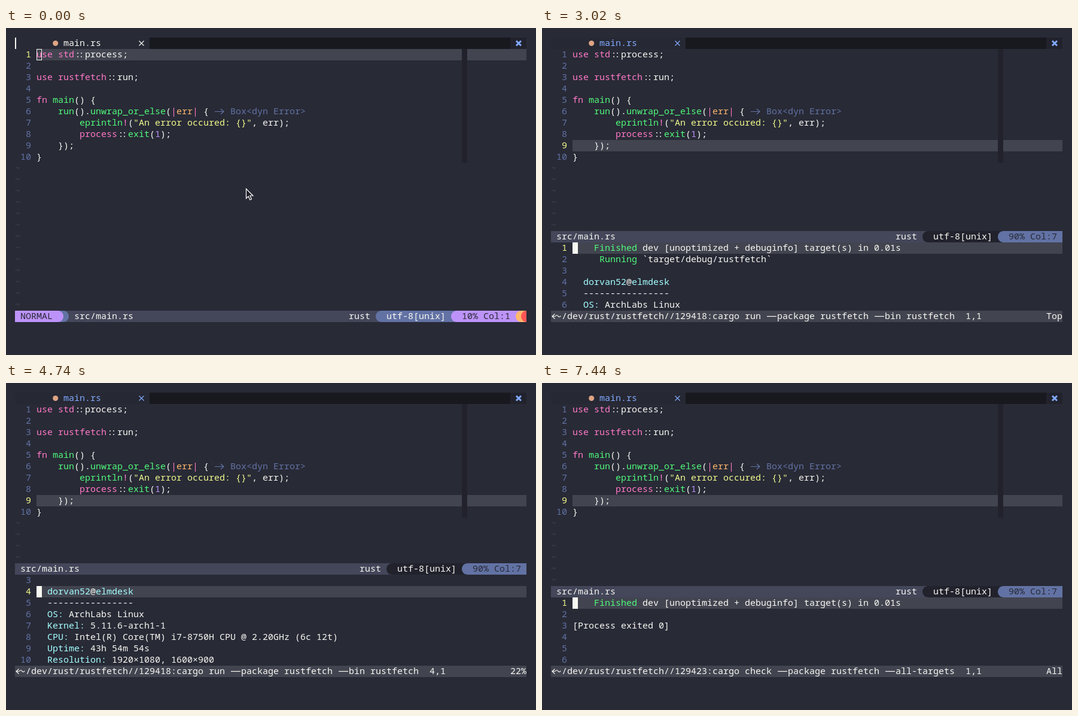
These frames come from a looping animation (886x546 px, 8 s). An HTML page:

```html
<!DOCTYPE html>
<html lang="en">
<head>
<meta charset="utf-8">
<title>Editor session</title>
<style>
html, body { margin: 0; width: 100%; height: 100%; overflow: hidden; background: #282a36; }
svg { display: block; }
text { font: 15px "Noto Sans Mono", "DejaVu Sans Mono", monospace; white-space: pre; font-variant-ligatures: none; }
</style>
</head>
<body>
<svg id="stage" width="886" height="546" viewBox="0 0 886 546"></svg>
<script>
const LOOP = 8000, COLS = 95, STATUS_ROW = 24, CMD_ROW = 25;
const C = {
  bg: '#282a36', dark: '#21222c', tabs: '#18191f', line: '#424450', bar: '#44475a',
  w: '#f8f8f2', p: '#ff79c6', g: '#50fa7b', y: '#f1fa8c', o: '#ffb86c', v: '#bd93f9',
  b: '#6272a4', c: '#a4ffff', r: '#ff5555', tab: '#82aaff', mint: '#a6f3d0', soot: '#212121'
};

// Lines are flat lists of colour key, text, colour key, text ...
const CODE = [
  ['p', 'use std', 'w', '::process;'],
  [],
  ['p', 'use rustfetch', 'w', '::run;'],
  [],
  ['p', 'fn ', 'g', 'main', 'w', '() {'],
  ['g', '    run', 'w', '().', 'g', 'unwrap_or_else', 'w', '(', 'p', '|', 'o', 'err', 'p', '|', 'w', ' { ', 'b', '-> Box<dyn Error>'],
  ['g', '        eprintln', 'p', '!', 'w', '(', 'y', '"An error occured: {}"', 'w', ', err);'],
  ['p', '        process', 'w', '::', 'g', 'exit', 'w', '(', 'v', '1', 'w', ');'],
  ['w', '    });'],
  ['w', '}']
];
const finished = ['g', '    Finished', 'w', ' dev [unoptimized + debuginfo] target(s) in 0.01s'];
const exited = ['w', '[Process exited 0]'];
const info = (label, value) => ['c', `  ${label}: `, 'w', value];
const RUN = {
  job: 129418, command: 'cargo run --package rustfetch --bin rustfetch',
  lines: [
    finished,
    ['g', '     Running', 'w', ' `target/debug/rustfetch`'],
    [],
    ['c', '  dorvan52', 'w', '@', 'c', 'elmdesk'],
    ['w', '  ' + '-'.repeat(16)],
    info('OS', 'ArchLabs Linux'),
    info('Kernel', '5.11.6-arch1-1'),
    info('CPU', 'Intel(R) Core(TM) i7-8750H CPU @ 2.20GHz (6c 12t)'),
    info('Uptime', '43h 54m 54s'),
    info('Resolution', '1920×1080, 1600×900'),
    info('Packages', '1187'),
    info('WM', 'bspwm'),
    info('Shell', '/bin/zsh'),
    info('Memory', '4911_MB / 15878_MB'),
    [], [],
    exited
  ]
};
const CHECK = {
  job: 129423, command: 'cargo check --package rustfetch --all-targets',
  lines: [finished, [], exited, [], [], []]
};

const X = col => 15 + 9 * col;
const Y = row => 16 + 19 * row;
const escape = s => s.replace(/&/g, '&amp;').replace(/</g, '&lt;');
const box = (x, y, w, h, fill) => `<rect x="${x}" y="${y}" width="${w}" height="${h}" fill="${fill}"/>`;
const cells = (row, col, n, fill) => box(X(col), Y(row), 9 * n, 19, fill);
const stroke = (d, color, width = 1.2) => `<path d="${d}" fill="none" stroke="${color}" stroke-width="${width}"/>`;
const glyphs = (x, row, s, fill) => `<text x="${x}" y="${Y(row) + 14}" fill="${fill}">${escape(s)}</text>`;

// Text on the cell grid, with the joined forms of "::", "--" and "->".
function text(row, col, s, fill) {
  let out = '';
  for (const part of s.split(/(::|->|(?<!-)--(?!-))/)) {
    const x = X(col), y = Y(row) + 9.5;
    if (part === '::') out += glyphs(x + 1.5, row, ':', fill) + glyphs(x + 7.5, row, ':', fill);
    else if (part === '--') out += stroke(`M${x + 1} ${y}h16`, fill);
    else if (part === '->') out += stroke(`M${x + 1} ${y}h15m-5 -4.5l5 4.5l-5 4.5`, fill);
    else if (part.trim()) {
      const lead = part.length - part.trimStart().length;
      out += glyphs(X(col + lead), row, part.trim(), fill);
    }
    col += part.length;
  }
  return out;
}

function line(row, parts) {
  let out = '', col = 4;
  for (let i = 0; i < parts.length; i += 2) {
    out += text(row, col, parts[i + 1], C[parts[i]]);
    col += parts[i + 1].length;
  }
  return out;
}

const number = (row, n, current) => text(row, 1, String(n).padStart(2), current ? C.y : C.b);
const block = (row, col) => cells(row, col, 1, C.w);

// Rounded end of a status segment; side 1 bulges right, -1 bulges left.
function cap(row, col, fill, side) {
  const x = side > 0 ? X(col) : X(col + 1);
  return `<path d="M${x} ${Y(row)}a9 9.5 0 0 ${side > 0 ? 1 : 0} 0 19z" fill="${fill}"/>`;
}

function tabLine(active) {
  const color = active ? C.w : C.tab;
  return cells(0, 0, COLS, C.tabs) + cells(0, 0, 25, active ? C.bg : '#262833') + cells(0, 92, 3, C.dark) +
    (active ? box(15, 16, 2, 19, C.w) : '') +
    '<circle cx="82.7" cy="25.5" r="4.5" fill="#dea584"/>' +
    text(0, 9, 'main.rs', color) +
    stroke('M222.5 21.5l8 8m0 -8l-8 8', color) +
    stroke('M853 21.5l8 8m0 -8l-8 8', C.tab, 3);
}

function codePane(s) {
  let out = '';
  if (s.line) out += cells(s.line, 4, COLS - 4, C.line);
  out += box(762, 35, 9, 190, C.dark);
  CODE.forEach((parts, i) => out += number(i + 1, i + 1, i + 1 === s.line) + line(i + 1, parts));
  for (let row = 11; row < s.statusRow; row++) out += text(row, 0, '~', C.line);
  if (s.mode === 'NORMAL') {
    out += s.line === 1
      ? `<rect x="51.5" y="35.5" width="8" height="18" fill="none" stroke="${C.w}"/>`
      : block(9, 10) + text(9, 10, ';', C.bg);
  }
  return out;
}

function activeStatus(s) {
  const row = s.statusRow, n = s.mode.length + 2;
  return cells(row, 0, COLS, C.bar) +
    cells(row, 0, n + 1, C.b) + cap(row, n + 1, C.b, 1) +
    cells(row, 0, n, C.v) + cap(row, n, C.v, 1) +
    text(row, 1, s.mode, C.bg) + text(row, n + 3, 'src/main.rs', C.w) +
    (s.line > 1 ? text(row, 54, 'main()', C.w) : '') + text(row, 62, 'rust', C.w) +
    cap(row, 67, C.b, -1) + cells(row, 68, 14, C.b) + text(row, 69, 'utf-8[unix]', C.w) +
    cap(row, 81, C.v, -1) + cells(row, 82, 12, C.v) +
    text(row, 83, s.line > 1 ? '90% Col:7' : '10% Col:1', C.bg) +
    cap(row, 93, C.o, -1) + cells(row, 94, 1, C.o) + cap(row, 94, C.r, -1);
}

function inactiveStatus(row) {
  return cells(row, 0, COLS, C.bar) + text(row, 1, 'src/main.rs', C.w) + text(row, 64, 'rust', C.w) +
    cap(row, 69, C.dark, -1) + cells(row, 70, 14, C.dark) + text(row, 71, 'utf-8[unix]', C.w) +
    cap(row, 83, C.b, -1) + cells(row, 84, 11, C.b) + text(row, 85, '90% Col:7', C.bg);
}

function terminalPane(s) {
  const { job, command, lines } = s.term, first = s.statusRow + 1, height = STATUS_ROW - first;
  let out = '';
  for (let i = 0; i < height; i++) {
    const n = s.top + i, row = first + i, current = n === s.cursor;
    if (current) out += cells(row, 4, COLS - 4, C.line);
    out += number(row, n, current);
    if (s.output) out += line(row, lines[n - 1] || []);
    if (current && s.inTerm) out += block(row, 4);
  }
  if (!s.inTerm) {
    return out + cells(STATUS_ROW, 0, COLS, C.soot) + cells(STATUS_ROW, 0, 10, C.b) + cap(STATUS_ROW, 10, C.b, 1) +
      text(STATUS_ROW, 1, 'TERMINAL', C.bg) + text(STATUS_ROW, 13, command, C.mint) +
      cap(STATUS_ROW, 83, C.b, -1) + cells(STATUS_ROW, 84, 11, C.b) +
      stroke('M781 477h11m-11 4.5h11m-11 4.5h11', C.bg) +
      text(STATUS_ROW, 87, s.cursor + '/17', C.bg) + text(STATUS_ROW, 92, '--', C.bg);
  }
  const above = s.top - 1, below = Math.max(0, lines.length - above - height);
  const place = above && below ? Math.floor(100 * above / (above + below)) + '%' : above ? 'Bot' : below ? 'Top' : 'All';
  const empty = !s.output || !lines[s.cursor - 1].length;
  return out + cells(STATUS_ROW, 0, COLS, C.line) +
    stroke('M21.5 477.5l-4.5 4l4.5 4M17 481.5h4c2 0 2.5 -2 4 -2s2 3 4 3q1.500 0 2 -2', C.w) +
    text(STATUS_ROW, 2, `/dev/rust/rustfetch//${job}:${command}`, C.w) +
    text(STATUS_ROW, 77, `${s.cursor},${empty ? '0-1' : '1'}`, C.w) + text(STATUS_ROW, 92, place, C.w);
}

function prompt(choice) {
  const rows = [':RustRunnables', 'Runnables: ', '1: run rustfetch', '2: cargo check -p rustfetch',
    '3: cargo test -p rustfetch', 'Type number and <Enter> or click with mouse (empty cancels): ' + choice];
  return box(0, Y(20), 886, 19 * 7, C.bg) + cells(20, 0, COLS, C.bar) +
    rows.map((s, i) => text(21 + i, 0, s, C.w)).join('');
}

function pointer(t) {
  const k = Math.min(1, Math.max(0, (t - 80) / 480)), e = k * k * (3 - 2 * k);
  return `<path transform="translate(${401.5 - 174 * e} ${268.5 - 119 * e})" d="M0 0v16l3.700 -3.500l2.600 6l2.700 -1.200l-2.600 -5.800h5z" fill="#20212a" stroke="#fff" stroke-width="1.200"/>`;
}

const TYPED = ':RustRunnables';
const KEYS = [860, 960, 1060, 1260, 1330, 1410, 1480, 1640, 1800, 2000, 2060, 2120, 2180, 2240];

function command(t) {
  if (t < 2880) return TYPED.slice(0, KEYS.filter(k => k <= t).length);
  if (t < 5540) return '';
  return TYPED.slice(0, t < 5760 ? 1 : t < 5840 ? 2 : t < 6140 ? 3 : 14);
}

function terminalCursor(t) {
  if (t < 3320) return 1;
  if (t < 3500) return 2;
  if (t < 3680) return Math.min(17, 3 + Math.floor((t - 3500) / 160 * 14));
  if (t < 3860) return 16;
  if (t < 4180) return Math.max(5, 15 - Math.floor((t - 3860) / 16));
  return t >= 4280 && t < 4440 ? 5 : 4;
}

function stateAt(t) {
  const second = t >= 6840, inTerm = t >= 2880 && t < 5200 || second;
  const cursor = second ? 1 : terminalCursor(t);
  const top = second ? 1 : t < 3680 ? Math.max(1, cursor - 4) : t < 4180 ? Math.min(12, cursor - 1) : 3;
  const cmd = inTerm ? '' : command(t);
  return {
    inTerm, cursor, cmd, mode: inTerm ? '' : cmd ? 'COMMAND' : 'NORMAL',
    top: Math.min(12, top),
    term: t < 2880 ? null : second ? CHECK : RUN,
    output: second ? t >= 6880 : t >= 2940,
    line: t < 320 ? 1 : 9,
    statusRow: t < 2880 ? STATUS_ROW : second || t < 4640 ? 17 : t < 4740 ? 16 : 15,
    asking: t >= 2380 && t < 2880 || t >= 6300 && t < 6840,
    choice: t >= 6660 ? '2' : t >= 2720 && t < 2880 ? '1' : ''
  };
}

function draw(t) {
  const s = stateAt(t);
  let out = box(0, 0, 886, 546, C.bg) + tabLine(!s.inTerm) + codePane(s);
  out += s.inTerm ? inactiveStatus(s.statusRow) : activeStatus(s);
  if (s.term) out += terminalPane(s);
  if (s.asking) out += prompt(s.choice);
  else if (s.cmd) out += text(CMD_ROW, 0, s.cmd, C.w) + block(CMD_ROW, s.cmd.length);
  if (t < 2880) out += pointer(t);
  return out;
}

const stage = document.getElementById('stage');
let shown = '';
const start = performance.now();
function tick() {
  const picture = draw((performance.now() - start) % LOOP);
  if (picture !== shown) stage.innerHTML = shown = picture;
  requestAnimationFrame(tick);
}
tick();
</script>
</body>
</html>
```
